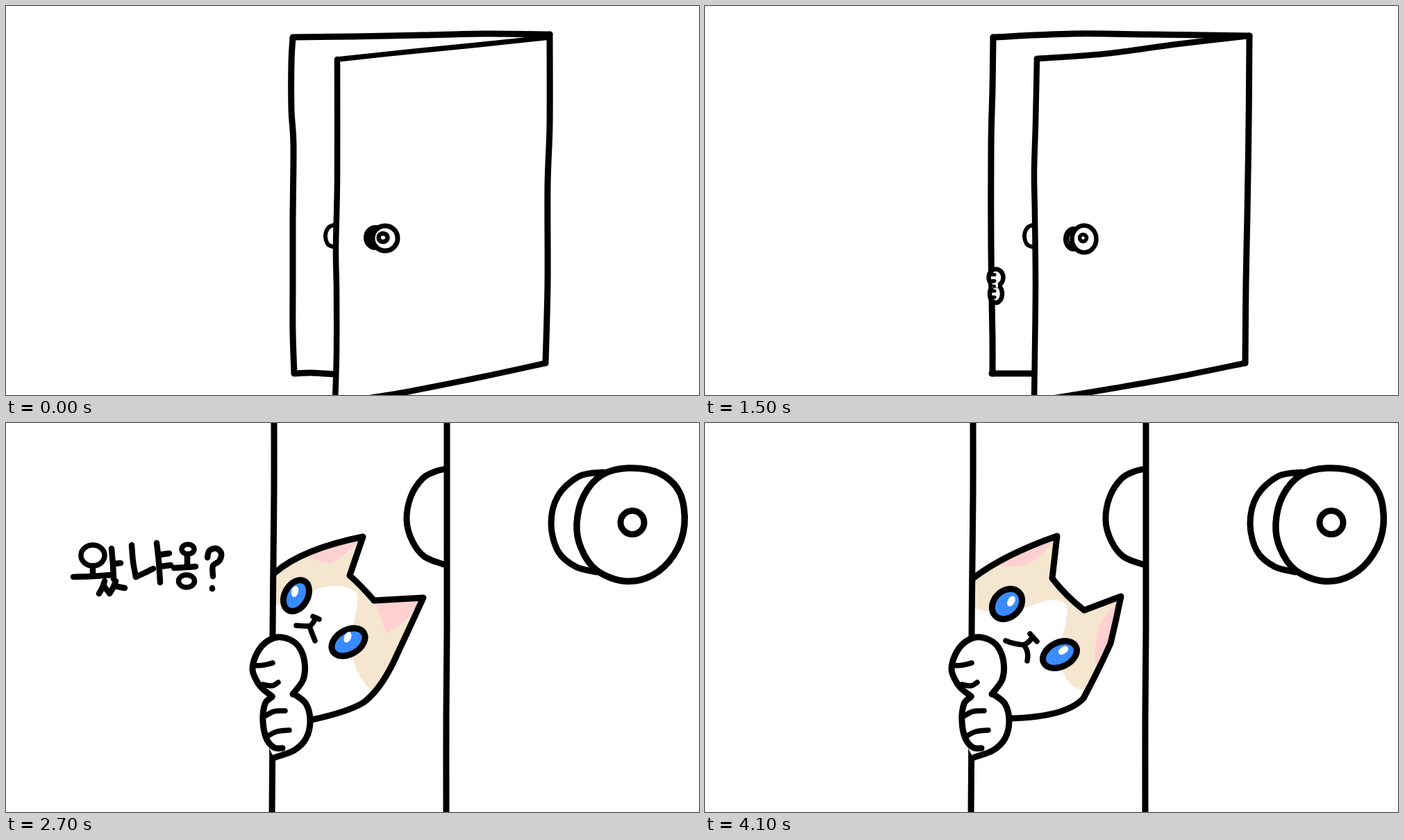
An HTML page with a canvas for the animation above (4.3 s loop, 998x561 px).

```html
<!DOCTYPE html>
<html lang="ko">
<head>
<meta charset="utf-8">
<title>Peeking cat</title>
<style>
  html, body { margin: 0; width: 100%; height: 100%; overflow: hidden; background: #fff; }
  canvas { display: block; width: 100%; height: 100%; }
</style>
</head>
<body>
<canvas width="998" height="561" role="img" aria-label="왔냐옹?"></canvas>
<script>
const ctx = document.querySelector('canvas').getContext('2d');
const LOOP = 4300, STEP = 100;
const TAN = '#f5e6cf', PINK = '#ffd0d2', BLUE = '#3a8bff';

// ---------- helpers ----------
const lerp = (a, b, u) => a + (b - a) * u;
const numbers = s => s.match(/-?[\d.]+/g).map(Number);

function mixPath(a, b, u) {
  const to = numbers(b);
  let i = 0;
  return a.replace(/-?[\d.]+/g, n => lerp(+n, to[i++], u).toFixed(2));
}

// Smooth path through "x,y x,y ..." with an optional hand wobble.
function curve(points, wobble = 0, closed = false) {
  const n = numbers(points), p = [];
  for (let i = 0; i < n.length; i += 2) {
    p.push([n[i] + wobble * Math.sin(n[i] * 1.7 + n[i + 1] * 2.3),
            n[i + 1] + wobble * Math.cos(n[i] * 2.9 + n[i + 1])]);
  }
  const at = i => closed ? p[(i + p.length) % p.length] : p[Math.max(0, Math.min(p.length - 1, i))];
  const path = new Path2D();
  path.moveTo(...p[0]);
  for (let i = 0; i < p.length - (closed ? 0 : 1); i++) {
    const [a, b, c, d] = [at(i - 1), at(i), at(i + 1), at(i + 2)];
    path.bezierCurveTo(b[0] + (c[0] - a[0]) / 6, b[1] + (c[1] - a[1]) / 6,
                       c[0] - (d[0] - b[0]) / 6, c[1] - (d[1] - b[1]) / 6, ...c);
  }
  if (closed) path.closePath();
  return path;
}

function ink(path, width, fill) {
  if (fill) { ctx.fillStyle = fill; ctx.fill(path); }
  ctx.lineWidth = width;
  if (width) ctx.stroke(path);
}

function oval(x, y, rx, ry, width, fill, deg = 0) {
  const path = new Path2D();
  path.ellipse(x, y, rx, ry, deg * Math.PI / 180, 0, 7);
  ink(path, width, fill);
}

// ---------- wide view ----------
const doors = [
  { frame: ['472,530 440,530 413,530', '414,530 414,480 412,350 412,200 414,120 415,45',
            '415,45 530,40 640,41 784,43', '784,43 783,170 781,300 779,400 778,515'],
    leaf: ['474,570 475,500 476,400 475,300 474,240 476,170 478,76',
           '478,76 575,69 680,55 784,43', '778,515 680,535 590,551 505,565'], leafWidth: 8.5 },
  { frame: ['472,531 440,529 415,530', '415,529 413,470 413,400 413,310 414,200 411,150 411,80 413,46',
            '413,45 500,44 600,42 690,40 783,41', '783,41 783,170 780,260 780,400 777,515'],
    leaf: ['474,570 476,500 476,410 475,350 477,250 477,77',
           '477,77 580,66 680,56 783,45', '777,515 685,535 580,556 525,565'], leafWidth: 7.5 }
];

function drawDoor(v) {
  const d = doors[v];
  d.frame.forEach(p => ink(curve(p), 9));
  ink(curve('475,315 465,319 460,331 464,344 475,348'), 6);
  d.leaf.forEach((p, i) => ink(curve(p), i === 1 ? d.leafWidth : 8.5));
  if (v) {
    oval(532, 334, 14, 15, 6, '#000');
    oval(546, 335, 18, 18, 7, '#fff');
    oval(543, 334, 6.5, 6, 6.5, '#fff');
  } else {
    oval(531, 336, 12, 15, 6, '#fff');
    ink(curve('528,323 523,336 529,349'), 3);
    oval(546, 336, 17.5, 19.5, 6.5, '#fff');
    oval(544.5, 334.5, 5, 5, 5.5, '#fff');
  }
}

function drawSmallPaw(y, rx, ry) {
  oval(419, y, rx, ry, 6.5, '#fff');
  for (const dy of [-4, 5]) ink(curve(`410,${y + dy} 417,${y + dy}`), 5);
}

function drawEmergingPaw(y) {
  ink(curve(`417,${y - 12} 427,${y - 13} 434,${y - 4} 433,${y + 8} 427,${y + 13} 417,${y + 14}`), 6.5, '#fff');
  ink(curve(`419,${y - 6} 427,${y - 7} 421,${y - 1} 427,${y - 2}`), 4);
  ink(curve(`417,${y + 3} 425,${y + 2}`), 4);
}

function drawWide(tick, v) {
  drawDoor(v);
  if (tick === 6 || tick === 7) drawEmergingPaw(415);
  if (tick >= 8) drawSmallPaw(415, 9, 13);
  if (tick === 10) drawEmergingPaw(391);
  if (tick >= 11) {
    drawSmallPaw(391.5, 10.5, 12);
    ctx.fillStyle = '#fff';
    ctx.fillRect(413, 400, 9, 6);
    ink(curve('412,403 417,404'), 4);
  }
}

// ---------- close view ----------
const poses = {
  mid: {
    head: 'M386 224 Q430 190 507 163 L500 224 Q520 250 546 270 L599 250 Q592 285 584 318 Q565 360 545 397 Q520 424 440 426',
    muzzle: 'M386 264 Q400 275 435 272 Q470 265 485 258 Q512 250 522 264 Q522 290 512 315 Q505 375 545 386 L540 440 L386 440 Z',
    earL: 'M420 203 Q455 212 472 200 Q490 188 507 163 L450 184 Z',
    earR: 'M599 250 Q575 280 567 293 Q560 320 562 350 L584 318 Z',
    eyes: ['435 261 24 19 -45 441 257 30', '511 334 26 17.4 -27 516 328 55'],
    mouth: 'M433 314 Q445 319 459 320 Q468 316 472 308 M468 304 L478 315 M460 321 Q467 331 464 343'
  },
  up: {
    head: 'M386 217 Q425 182 514 164 L495 220 Q512 235 530 256 L601 252 Q580 298 558 345 Q538 386 515 403 Q492 417 440 428',
    muzzle: 'M386 262 Q402 264 425 252 Q450 236 470 235 Q500 235 507 248 Q506 270 498 300 Q493 355 527 387 L540 440 L386 440 Z',
    earL: 'M428 190 Q445 198 468 203 Q490 190 514 164 L450 180 Z',
    earR: 'M601 252 Q585 254 530 257 Q538 275 548 304 L575 285 Z',
    eyes: ['418 249 24 16.5 -61 416 243 15', '493 316 26 17.4 -31 492 309 22'],
    mouth: 'M418 292 Q428 293 437 293 Q442 290 445 283 M442 279 L451 283 M437 293 Q440 302 445 314'
  },
  down: {
    head: 'M386 222 Q440 190 500 161 L499 226 Q515 243 543 269 L595 244 Q594 280 584 318 Q567 350 545 395 Q520 426 440 426',
    muzzle: 'M386 266 Q405 282 430 286 Q500 292 517 250 Q525 260 532 275 Q534 295 526 325 Q528 372 547 386 L540 440 L386 440 Z',
    earL: 'M425 205 Q440 212 475 211 Q485 190 500 161 L450 186 Z',
    earR: 'M595 244 Q582 270 572 295 Q568 315 568 340 L586 315 Z',
    eyes: ['451 280 24.5 18.5 -45 462 275 22', '528 347 24 15.6 -39 537 339 32'],
    mouth: 'M457 333 Q470 338 480 339 Q488 336 490 330 M487 326 L498 333 M480 339 Q483 347 478 356'
  }
};
const sway = [[16, 'mid'], [19, 'mid'], [27, 'up'], [28, 'up'], [36, 'down'], [41, 'mid'], [43, 'mid']];
const slide = { 16: -220, 17: -130, 18: -50 };

function drawCat(tick) {
  const i = sway.findIndex((k, n) => tick >= k[0] && tick < sway[n + 1][0]);
  const [t0, from] = sway[i], [t1, to] = sway[i + 1];
  const x = (tick - t0) / (t1 - t0), u = x * x * (3 - 2 * x);
  const a = poses[from], b = poses[to];
  const part = name => new Path2D(mixPath(a[name], b[name], u));

  ctx.save();
  ctx.beginPath();
  ctx.rect(385, 0, 250, 561);
  ctx.clip();
  ctx.translate(slide[tick] || 0, 0);
  const head = part('head');
  ctx.save();
  const inside = new Path2D(head);
  inside.lineTo(386, 428);
  inside.closePath();
  ctx.clip(inside);
  ink(inside, 0, TAN);
  ink(part('muzzle'), 0, '#fff');
  ink(part('earL'), 0, PINK);
  ink(part('earR'), 0, PINK);
  ctx.restore();
  ink(head, 9);
  a.eyes.forEach((eye, n) => {
    const [cx, cy, rx, ry, deg, hx, hy, tilt] = numbers(mixPath(eye, b.eyes[n], u));
    oval(cx, cy, rx, ry, 9, BLUE, deg);
    oval(hx, hy, 5, 8, 0, '#fff', tilt);
  });
  ink(part('mouth'), 7.5);
  ctx.restore();
}

const pawShapes = [
  '383,395 373,405 370,430 375,455 388,482 415,472 432,455 438,430 432,405 415,391',
  '383,394 368,382 360,370 355,355 360,335 372,318 390,309 408,312 422,323 430,345 428,370 413,391'
];
const pawLines = [
  '413,391 428,370 430,345 422,323 408,312 390,309 372,318 360,335 355,355 360,370 368,382 383,394',
  '415,391 432,405 438,430 432,455 415,472 388,482',
  '383,395 373,405 370,430 375,455 386,468 398,469'
];
const toes = ['359,350 372,349 384,346', '370,377 383,379 392,374',
              '374,422 386,416 402,415', '376,452 390,445 408,443'];

function drawPaws(w) {
  pawShapes.forEach(p => ink(curve(p, w), 0, '#fff'));
  pawLines.forEach(p => ink(curve(p, w), 9));
  toes.forEach(p => ink(curve(p, w), 7.5));
}

function drawKnobs(w) {
  ink(curve('634,66 618,70 600,80 583,106 577,140 585,170 603,193 634,205', w), 9);
  ink(curve('860,71 825,77 795,105 785,145 795,185 820,207 850,215', w), 9);
  ink(curve('896,65 940,72 970,100 977,147 962,190 930,220 890,228 850,212 828,180 822,145 832,105 858,75', w, true), 9.5, '#fff');
  oval(902 + w / 2, 143.5, 17, 17, 9, '#fff');
}

const syllables = [
  { rings: [[125, 191, 17, 15]],
    lines: ['125,206 125,220', '97,222 125,221 151,219', '152,181 154,205 155,225', '155,203 165,202',
            '142,228 139,237 134,246', '140,234 147,243', '158,228 154,238 149,246', '156,235 171,238'] },
  { rings: [], lines: ['181,176 183,200 187,222', '187,222 200,216 212,210', '217,173 220,200 222,230',
                       '221,190 235,188', '222,207 237,205'] },
  { rings: [[262, 182, 9, 7], [260, 228, 11.5, 9]], lines: ['261,191 261,206', '242,209 260,208 273,207'] },
  { rings: [], lines: ['290,194 293,184 303,181 310,188 307,199 298,206 298,221', '297,238 297,239'] }
];

function drawText(count) {
  for (const s of syllables.slice(0, count)) {
    s.rings.forEach(r => oval(...r, 7.5));
    s.lines.forEach(p => ink(curve(p), 8.5));
  }
}

function drawClose(tick, v) {
  const w = v * 1.5;
  drawCat(tick);
  ink(curve('386,-9 386,100 385,200 384,310 384,420 383,570', w), 9);
  ink(curve('635,-9 635,150 635,300 634,420 634,570', w), 9);
  drawKnobs(w);
  drawPaws(w);
  drawText(tick < 39 ? Math.max(0, tick - 20) : 0);
}

// ---------- clock ----------
const holds = { 28: 27, 35: 34, 42: 41 };

function draw() {
  let tick = Math.floor(performance.now() % LOOP / STEP);
  tick = holds[tick] ?? tick;
  const v = tick === 41 || (tick < 28) === (tick % 2 === 1) ? 0 : 1;
  ctx.fillStyle = '#fff';
  ctx.fillRect(0, 0, 998, 561);
  ctx.strokeStyle = '#000';
  ctx.lineCap = ctx.lineJoin = 'round';
  (tick < 16 ? drawWide : drawClose)(tick, v);
  requestAnimationFrame(draw);
}
draw();
</script>
</body>
</html>
```
